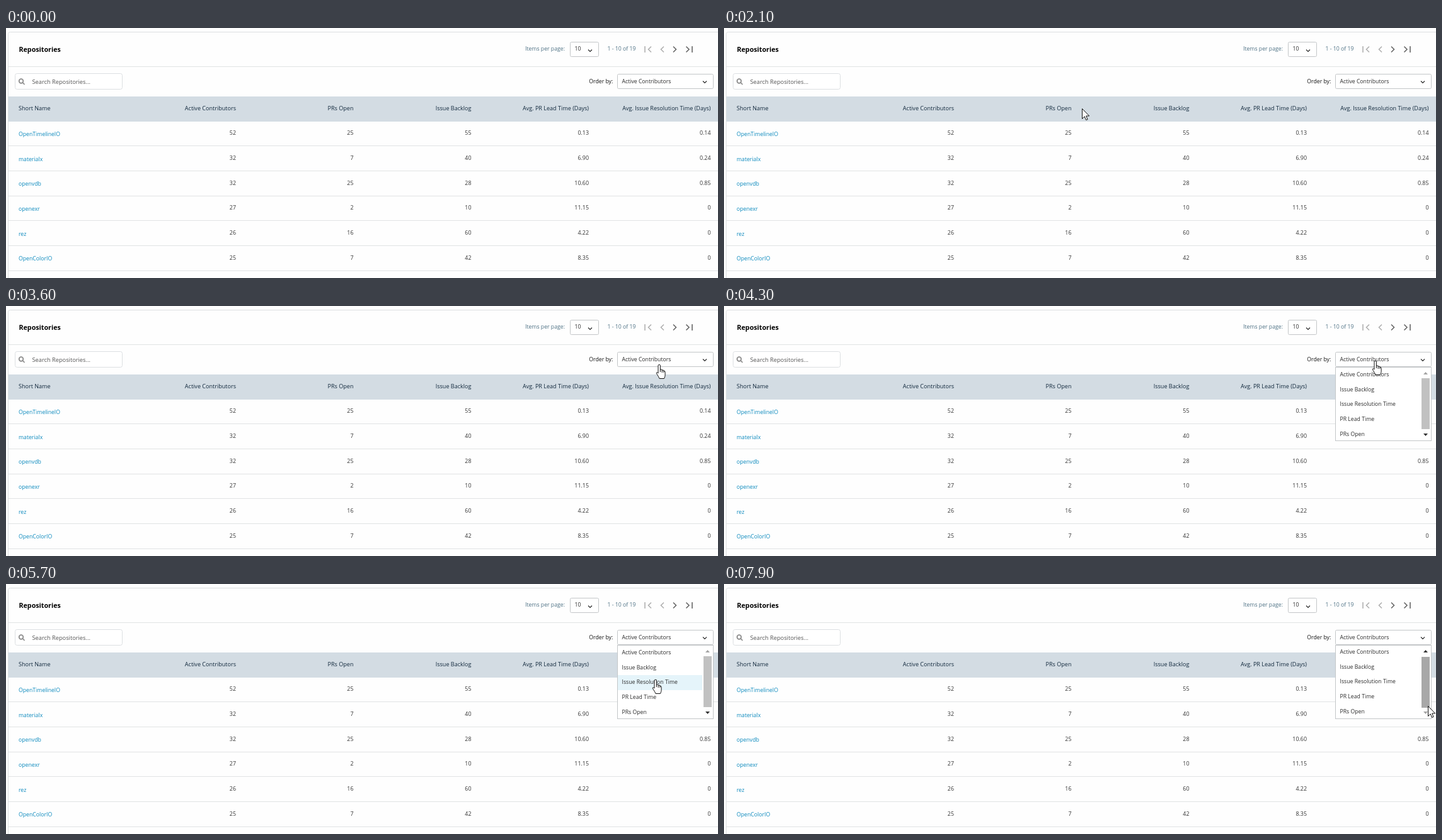
Animation of 1130x398 px, one loop 8 s. Source, as an HTML page:

```html
<!DOCTYPE html>
<html lang="en">
<head>
<meta charset="utf-8">
<title>Repositories table</title>
<style>
  html, body { margin: 0; width: 100%; height: 100%; overflow: hidden; background: #fefefe; }
  svg { display: block; width: 1130px; height: 398px; }
  text { font: 8.7px "Open Sans", sans-serif; fill: #2b2b2b; white-space: pre; }
  .title { font-size: 10.7px; font-weight: 700; fill: #000; }
  .muted { fill: #4f7285; }
  .head { font-size: 9.05px; fill: #12293d; }
  .num { font-size: 8.9px; fill: #333; }
  .right { text-anchor: end; }
  .link { fill: #0b89bd; }
  .hint { font-size: 9.25px; fill: #555; }
  .box { fill: #fff; stroke: #c3c6c8; }
  .rule { stroke: #e1e3e4; }
  .icon { fill: none; stroke: #666; stroke-width: 1.6; }
  .off { stroke: #b0b0b0; }
  .chevron { fill: none; stroke: #222; stroke-width: 1.1; }
  #pointer path { fill: #fff; stroke: #111; stroke-linejoin: round; }
</style>
</head>
<body>
<svg viewBox="0 0 1130 398">
  <defs>
    <path id="chevron" d="M-3-1.5l3 3 3-3"/>
    <path id="next" d="M0-4.5L4.5 0 0 4.5"/>
    <path id="bar" d="M0-5V5"/>
    <path id="triangle" d="M-3.5 2L0-2l3.5 4z"/>
  </defs>
  <path d="M3.5 400V9.5a3 3 0 0 1 3-3H1132V400z" fill="#fefefe" stroke="#dcdfe1"/>
  <path class="rule" d="M4 61.5H1130"/>
  <text class="title" x="20.5" y="38">Repositories</text>

  <text class="muted" x="824" y="36">Items per page:</text>
  <rect class="box" x="895.5" y="22.5" width="45" height="23" rx="2"/>
  <text x="902.5" y="36">10</text>
  <use class="chevron" href="#chevron" x="927" y="36"/>
  <text class="muted" x="954.5" y="36">1 - 10 of 19</text>
  <g class="icon off">
    <use href="#bar" x="1014" y="34"/>
    <use href="#next" transform="translate(1024 34) scale(-1 1)"/>
    <use href="#next" transform="translate(1044 34) scale(-1 1)"/>
  </g>
  <g class="icon">
    <use href="#next" x="1059" y="34"/>
    <use href="#next" x="1079.5" y="34"/>
    <use href="#bar" x="1089" y="34"/>
  </g>

  <rect id="search" class="box" x="14.5" y="72.5" width="170" height="25" rx="3" style="stroke:#dcdfe2"/>
  <g fill="none" stroke="#8a8a8a" stroke-width="1.7">
    <circle cx="24" cy="84.5" r="3.3"/><path d="M26.5 87l3 3"/>
  </g>
  <text class="hint" x="41.5" y="89">Search Repositories...</text>

  <text x="925.3" y="88" style="fill:#111">Order by:</text>
  <rect id="select" class="box" x="970.5" y="73.5" width="152" height="23" rx="2"/>
  <text x="977.5" y="88">Active Contributors</text>
  <use class="chevron" href="#chevron" x="1109" y="86"/>

  <rect x="4" y="109" width="1126" height="40" fill="#d3dce3"/>
  <g id="table"></g>

  <g id="menu">
    <rect class="box" x="970.5" y="97.5" width="152" height="117"/>
    <rect id="list" x="971" y="98" width="134" height="116" fill="none"/>
    <rect id="lit" x="971" width="134" height="24" fill="#e5f4fa"/>
    <g id="options"></g>
    <use id="up" href="#triangle" x="1113.5" y="107"/>
    <rect id="thumb" x="1107" width="13" height="81"/>
    <use id="down" href="#triangle" transform="translate(1113.5 205) scale(1 -1)"/>
  </g>

  <g id="pointer">
    <path id="arrow" d="M.5.5v16l3.7-3.6 2.5 5.6 2.4-1-2.4-5.5h5z"/>
    <path id="beam" d="M-3-7.5H3M0-7V7M-3 7.5H3"/>
    <path id="hand" d="M-2 13V2a1.7 1.7 0 0 1 3.4 0v6q2.6-.6 2.8 1 2.5-.6 2.7 1.2 2.2-.4 2.2 2v5q0 2-1.6 5.3H0q-1-2.6-3-5.6-2.4-3-1.6-3.8 1-1 2.6.9zM1.400 8v4M4.200 9v4M6.900 10v3"/>
  </g>
</svg>
<script>
const $ = id => document.getElementById(id);
const text = (cls, x, y, s) => `<text class="${cls}" x="${x}" y="${y}">${s}</text>`;

const edges = [365, 551.5, 738.5, 925, 1118.5];
const heads = ['Active Contributors', 'PRs Open', 'Issue Backlog',
  'Avg. PR Lead Time (Days)', 'Avg. Issue Resolution Time (Days)'];
const rows = [
  'OpenTimelineIO 52 25 55 0.13 0.14',
  'materialx 32 7 40 6.90 0.24',
  'openvdb 32 25 28 10.60 0.85',
  'openexr 27 2 10 11.15 0',
  'rez 26 16 60 4.22 0',
  'OpenColorIO 25 7 42 8.35 0'
];
const cells = (cls, y, list) => list.map((s, i) => text(cls + ' right', edges[i], y, s)).join('');

$('table').innerHTML = text('head', 20, 131, 'Short Name') + cells('head', 131, heads) +
  rows.map((row, i) => {
    const [name, ...values] = row.split(' ');
    const line = Math.round(187 + 39.75 * i);
    return text('link', 20, Math.round(172.1 + 39.6 * i), name) + cells('num', line - 17, values) +
      `<path class="rule" d="M4 ${line + 0.5}H1130"/>`;
  }).join('');

const itemTop = 97.5, itemStep = 23.7;
$('options').innerHTML = ['Active Contributors', 'Issue Backlog', 'Issue Resolution Time', 'PR Lead Time', 'PRs Open']
  .map((s, i) => text('', 977.5, Math.round(111.8 + itemStep * i), s)).join('');

const tick = 100, loop = 8000, openAt = 4300, scrollAt = 7500;
const headY = 128, selectX = 1034, rightX = 1120;
const itemY = i => itemTop + itemStep * (i + 0.4);

// Pointer stops: first step, last step, x, y
const start = [72, -50];
const stops = [
  [300, 600, 27, headY],
  [1000, 1400, edges[0] + 7, headY],
  [1600, 1800, edges[1] - 24, headY],
  [2000, 2100, edges[1] + 16.5, headY],
  [2300, 2500, edges[2] + 29.5, headY + 5],
  [2800, 3400, selectX + 5, 110],
  [3600, 3600, selectX + 3, 93],
  [3700, 4100, selectX, 87],
  [4900, 5100, selectX - 1, itemY(0)],
  [5300, 5700, selectX - 3, itemY(2) - 2.4],
  [6000, 6500, rightX + 4, itemY(3)],
  [6700, 6700, rightX, 170],
  [7400, 7900, rightX - 3, 194]
];

function pointerAt(t) {
  let [x, y] = start;
  for (const [from, to, endX, endY] of stops) {
    if (t < from) break;
    const p = Math.min(1, (t - from + tick) / (to - from + tick));
    x += (endX - x) * p;
    y += (endY - y) * p;
  }
  return [x, y];
}

function over(el, x, y) {
  const b = el.getBBox();
  return x >= b.x && x <= b.x + b.width && y >= b.y && y <= b.y + b.height;
}

const typeAreas = [$('search'), ...document.querySelectorAll('.head')];
const show = (id, on) => $(id).style.visibility = on ? '' : 'hidden';
const paint = (id, color) => $(id).setAttribute('fill', color);

function draw(now) {
  const t = Math.floor(now % loop / tick) * tick;
  const [x, y] = pointerAt(t);
  const open = t >= openAt, scroll = t >= scrollAt ? 1 : 0;
  const onItem = open && over($('list'), x, y);
  const shape = onItem || over($('select'), x, y) ? 'hand'
    : !open && typeAreas.some(el => over(el, x, y)) ? 'beam' : 'arrow';

  for (const id of ['arrow', 'beam', 'hand']) show(id, id === shape);
  show('pointer', t >= stops[0][0]);
  $('pointer').setAttribute('transform', `translate(${x} ${y})`);

  show('menu', open);
  show('lit', onItem);
  const item = Math.floor((y - itemTop) / itemStep);
  $('lit').setAttribute('y', Math.round(itemTop + itemStep * item));
  $('options').setAttribute('transform', `translate(0 ${-scroll})`);
  $('thumb').setAttribute('y', 115 + scroll);
  paint('thumb', over($('thumb'), x, y) ? '#a8a8a8' : '#c1c1c1');
  paint('up', scroll ? '#333' : '#a3a3a3');
  paint('down', scroll ? '#a3a3a3' : '#333');
}

const begin = performance.now();
function frame() {
  draw(performance.now() - begin);
  requestAnimationFrame(frame);
}
frame();
</script>
</body>
</html>
```
